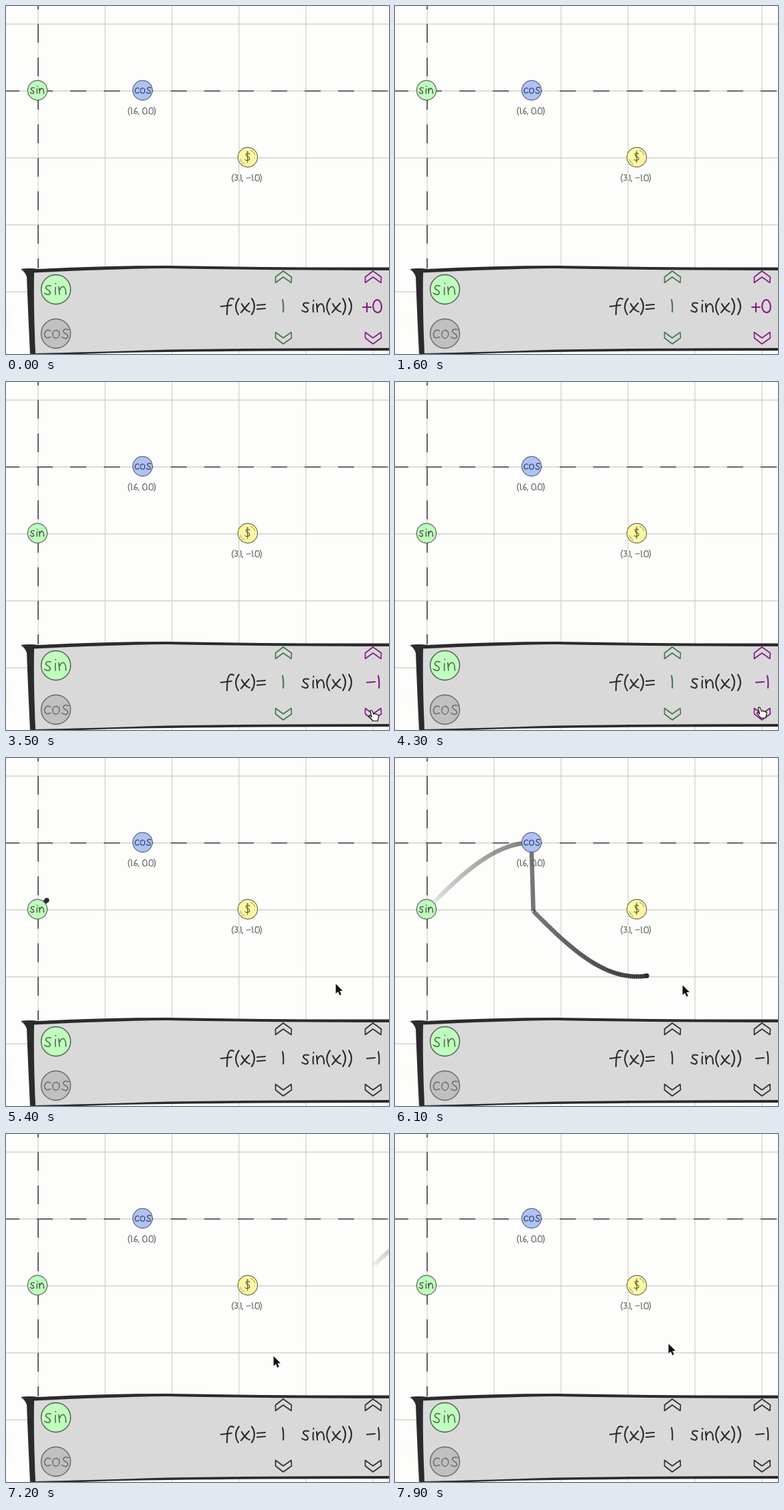
An HTML page with a canvas for the animation above (8000 ms loop, 572 by 520 pixels).

```html
<!DOCTYPE html>
<html lang="en">
<head>
<meta charset="utf-8">
<title>Function graph game</title>
<style>
  html, body { margin: 0; width: 100%; height: 100%; overflow: hidden; background: #fdfdfb; }
  canvas { display: block; }
</style>
</head>
<body>
<canvas id="stage" width="572" height="520"></canvas>
<script>
const ctx = document.getElementById('stage').getContext('2d');
const LOOP = 8000, CLICK = 3000, LAUNCH = 5370;
const SPEED = 0.45, TRAIL_LIFE = 723;
const ORIGIN = { x: 47, y: 126.5 }, UNIT = 100;
const PAPER = '#fdfdfb', INK = '#2b2b2d', GREEN = '#42774a', PURPLE = '#831983';

// Hand lettering: advance width and strokes on a baseline at y = 0.
const GLYPHS = {
  s: [14, 'M10-13Q2-15 2-10Q3-8 7-6Q11-2 7 0Q4 1 0-2'],
  i: [7, 'M3-11Q2-5 3 0M3-17l.6 .6'],
  n: [15, 'M1-12L2 0M2-6Q4-12 8-12Q12-11 12 0'],
  c: [13, 'M10-11Q4-15 1-7Q1 2 10-2'],
  o: [14, 'M6-12C-2-12-1 0 5 0S13-12 5-12'],
  f: [21, 'M19-19Q12-23 10-12Q9-4 9 4M0-8L16-10'],
  x: [16, 'M2-12Q7-2 14 0M13-13L1 1'],
  '(': [8, 'M6-20Q-3-8 5 4'],
  ')': [9, 'M1-20Q9-8 1 4'],
  '=': [13, 'M0-10L12-11M0-4L12-5'],
  '1': [6, 'M2-18Q4-10 3 0'],
  '3': [13, 'M2-17Q12-20 9-13Q8-10 5-10Q12-9 9-3Q6 1 1-2'],
  '6': [12, 'M8-18Q-1-8 2-2Q6 2 10-3Q11-9 2-6'],
  '+': [14, 'M0-7H12M6-13V0'],
  '-': [15, 'M0-8L12-9'],
  '0': [15, 'M8-18C-1-18-1 1 8 1S15-18 7-18'],
  '$': [10, 'M9-13Q1-16 2-10Q3-8 6-7Q10-5 9-2Q5 2 0-1M5-18V4'],
  '.': [4, 'M1-1l.6 .6'],
  ',': [5, 'M2-1L1 3'],
  ' ': [8, '']
};
for (const key in GLYPHS) GLYPHS[key][1] = new Path2D(GLYPHS[key][1]);

const PANEL_EDGE = new Path2D('M22 393Q36 391 48 393Q150 388 240 388Q400 391 575 390.5V515Q380 515 240 517Q150 518 90 521H36Q33 460 31 405Q29 398 22 393Z');
const PANEL_FILL = new Path2D('M42 398.5Q150 393 240 392Q400 395 575 395V511Q380 511 240 513.5Q130 517 44 519Q41 450 42 398.5Z');
const CHEVRON = new Path2D('M0-9L12.5 0L12 8.5L0 0L-11.5 8.5L-11.5 0Z');
const ARROW = new Path2D('M0 0V14.5L3.4 11.5L5.8 17L8.2 16L5.9 10.6H10.4Z');
const HAND = new Path2D('M-1 1Q0-1 2 1L4 6Q6 4 7 6Q9 5 10 7Q12 7 11.5 10L10 16H3L-3 9Q-3 7-1 8L1 10Z');

function lettering(text, x, baseline, scale, color, width) {
  ctx.save();
  ctx.translate(x, baseline);
  ctx.scale(scale, scale);
  ctx.strokeStyle = color;
  ctx.lineWidth = width / scale;
  ctx.lineCap = ctx.lineJoin = 'round';
  for (const ch of text) {
    const [advance, path] = GLYPHS[ch];
    ctx.stroke(path);
    ctx.translate(advance, 0);
  }
  ctx.restore();
}

function paintAt(path, x, y, { fill, stroke, width = 1, flip = 1 }) {
  ctx.save();
  ctx.translate(x, y);
  ctx.scale(1, flip);
  ctx.lineJoin = 'round';
  if (fill) { ctx.fillStyle = fill; ctx.fill(path); }
  if (stroke) { ctx.strokeStyle = stroke; ctx.lineWidth = width; ctx.stroke(path); }
  ctx.restore();
}

function disc(x, y, r, fill, stroke, width = 1.2) {
  const path = new Path2D();
  path.arc(0, 0, r, 0, 7);
  paintAt(path, x, y, { fill, stroke, width });
}

function line(x1, y1, x2, y2) {
  ctx.beginPath();
  ctx.moveTo(x1, y1);
  ctx.lineTo(x2, y2);
  ctx.stroke();
}

function drawGrid() {
  ctx.fillStyle = PAPER;
  ctx.fillRect(0, 0, 572, 520);
  const glow = ctx.createRadialGradient(-10, 468, 2, -10, 468, 22);
  glow.addColorStop(0, '#f1f1ea');
  glow.addColorStop(1, '#f1f1ea00');
  ctx.fillStyle = glow;
  ctx.fillRect(0, 430, 20, 80);

  ctx.strokeStyle = '#d2d2cb';
  ctx.lineWidth = 1.3;
  for (let x = 48; x < 572; x += UNIT) line(x, 0, x, 520);
  for (let y = 27; y < 520; y += UNIT) line(0, y, 572, y);

  ctx.strokeStyle = '#444';
  ctx.lineWidth = 1.6;
  ctx.setLineDash([24, 26]);
  line(-4, 127, 572, 127);
  ctx.setLineDash([28, 22]);
  line(48, -23, 48, 392);
  ctx.setLineDash([]);
}

// The ball follows sin(x) - 1 and switches to cos(x) - 1 at the cos point.
function curvePoint(distance) {
  const u = distance / UNIT;
  const value = (u < Math.PI / 2 ? Math.sin(u) : Math.cos(u)) - 1;
  return [ORIGIN.x + distance, ORIGIN.y - value * UNIT];
}

function drawTrail(t) {
  if (t < LAUNCH) return;
  const head = (t - LAUNCH) * SPEED, length = TRAIL_LIFE * SPEED;
  const tail = head - length, step = 3;
  ctx.strokeStyle = INK;
  ctx.lineWidth = 6.5;
  ctx.lineCap = 'butt';
  for (let d = Math.max(0, tail); d < head && d < 540; d += step) {
    ctx.globalAlpha = Math.pow((d - tail) / length, 0.6);
    line(...curvePoint(d), ...curvePoint(Math.min(head, d + step)));
  }
  ctx.globalAlpha = 1;
  disc(...curvePoint(head), 3.6, INK);
}

function drawPoints(moved) {
  const y = ORIGIN.y - 0.5 + (moved ? UNIT : 0);
  disc(47, y, 14.6, '#c0fcbe', '#5c665c');
  lettering('sin', 36, y + 4.5, 0.62, '#3d5540', 1.4);

  disc(204, 126, 14.6, '#adc3f8', '#5f6676');
  lettering('cos', 192, 130.5, 0.66, '#46506a', 1.4);

  disc(361, 226, 14.6, '#fdf8a4', '#706e50');
  ctx.strokeStyle = '#94905c';
  ctx.lineWidth = 1;
  for (const start of [-1.2, 2]) {
    ctx.beginPath();
    ctx.arc(361, 226, 11.5, start, start + 0.9);
    ctx.stroke();
  }
  lettering('$', 357, 230.5, 0.75, '#66633a', 1.3);

  lettering('(1.6, 0.0)', 182, 161, 0.5, '#5e5e5e', 1.2);
  lettering('(3.1, -1.0)', 337, 261, 0.5, '#5e5e5e', 1.2);
}

function drawPanel(moved, running) {
  paintAt(PANEL_EDGE, 0, 0, { fill: INK });
  paintAt(PANEL_FILL, 0, 0, { fill: '#d9d9d9' });

  disc(74.5, 423.5, 22, '#c0febd', '#505a50', 1.4);
  lettering('sin', 57.5, 431, 0.97, '#46604a', 1.5);
  disc(74.5, 489.5, 22, '#c0c0c0', '#666', 1.4);
  lettering('cos', 56.5, 496.5, 1, '#686868', 1.5);

  const green = running ? INK : GREEN, purple = running ? INK : PURPLE;
  lettering('f(x)=', 321, 457, 1, INK, 2.1);
  lettering('1', 411, 457, 1, green, 2.1);
  lettering('sin(x))', 442, 457, 1, INK, 2.1);
  lettering(moved ? '-1' : '+0', moved ? 539 : 533, 457, 1, purple, 2.1);
  for (const [x, color] of [[414, green], [548, purple]]) {
    const style = { stroke: color, width: 1.6 };
    paintAt(CHEVRON, x, 405, style);
    paintAt(CHEVRON, x, 496, { ...style, flip: -1 });
  }
}

// Pointer stops: time, x, y.
const REST = [545, 490.5];
const POINTER = [
  [2200, 590, 500], [2500, ...REST], [4200, ...REST], [5200, 492.5, 337.5],
  [5500, 492.5, 337.5], [6500, 395.5, 340.5], [6900, 395.5, 340.5], [7700, 408.5, 313.5]
];

function drawPointer(t) {
  if (t < POINTER[0][0]) return;
  const next = POINTER.findIndex(stop => stop[0] > t);
  const [t1, x1, y1] = POINTER[next < 0 ? POINTER.length - 1 : next];
  const [t0, x0, y0] = next < 0 ? [0, x1, y1] : POINTER[next - 1];
  const k = Math.min(1, (t - t0) / (t1 - t0)), ease = k * k * (3 - 2 * k);
  const x = x0 + (x1 - x0) * ease, y = y0 + (y1 - y0) * ease;
  if (Math.hypot(x - REST[0], y - REST[1]) < 15) {
    paintAt(HAND, x, y, { fill: '#fff', stroke: '#111', width: 1.2 });
  } else {
    paintAt(ARROW, x, y, { stroke: '#fff', width: 1.5 });
    paintAt(ARROW, x, y, { fill: '#111' });
  }
}

function draw(t) {
  const moved = t >= CLICK, running = t >= LAUNCH - 100;
  drawGrid();
  drawTrail(t);
  drawPoints(moved);
  drawPanel(moved, running);
  drawPointer(t);
}

const begin = performance.now();
function tick() {
  draw((performance.now() - begin) % LOOP);
  requestAnimationFrame(tick);
}
tick();
</script>
</body>
</html>
```
